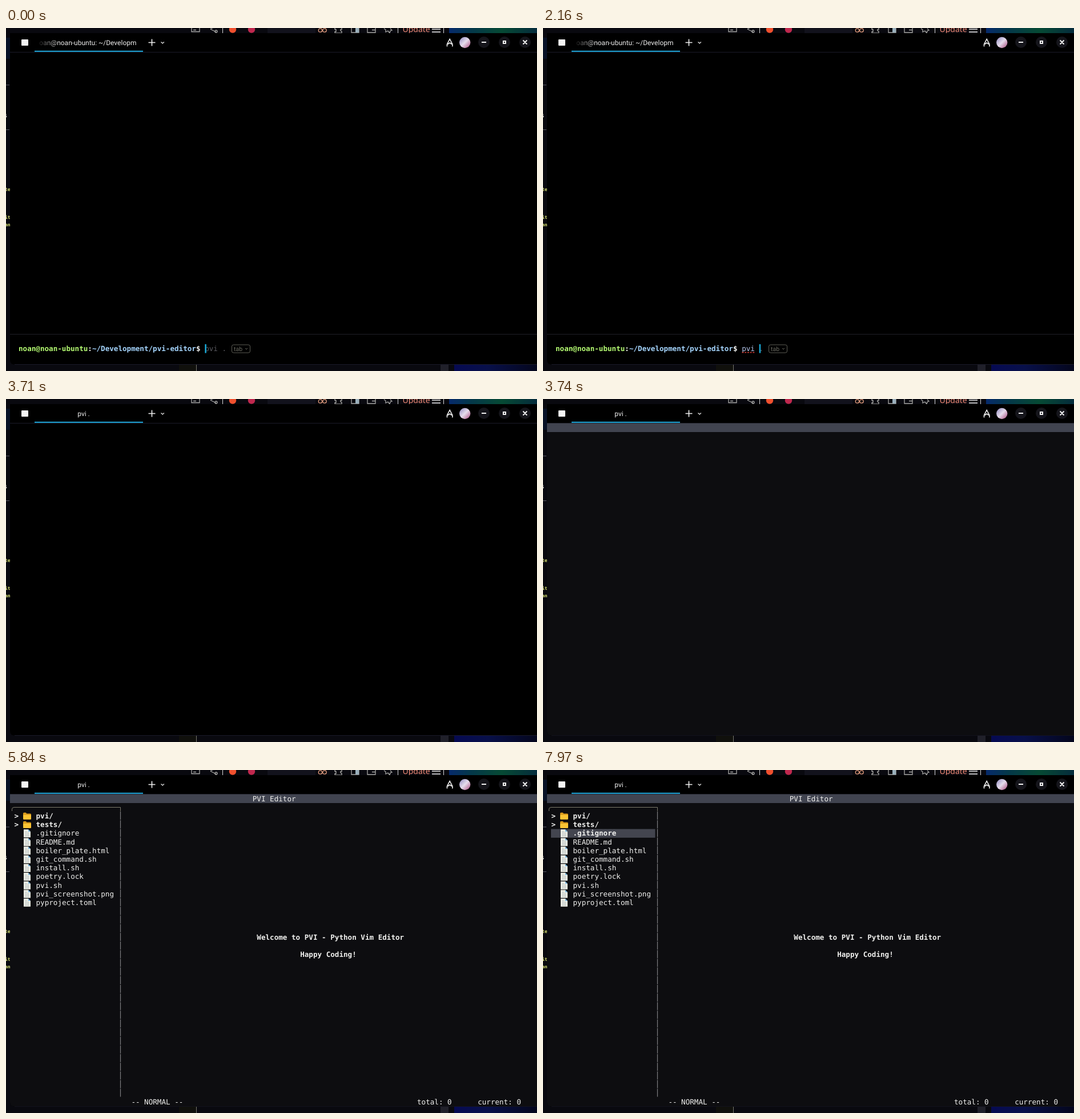
An HTML page for the animation above (7990 ms loop, 930 by 602 pixels).

```html
<!DOCTYPE html>
<html lang="en">
<head>
<meta charset="utf-8">
<title>Terminal editor</title>
<style>
html, body { margin: 0; width: 100%; height: 100%; overflow: hidden; background: #000; }
svg { display: block; width: 930px; height: 602px; }
text { white-space: pre; text-rendering: geometricPrecision; }
.mono { font: 12.6px "DejaVu Sans Mono", monospace; fill: #f0f0ee; }
.bold { font-weight: 700; }
.ui { font: 12px Roboto, sans-serif; fill: #ececec; }
.line { fill: none; stroke: #f2f2f2; stroke-width: 1.6; }
.icon { fill: none; stroke: #a9a9a6; stroke-width: 1.3; }
.lime { fill: #b4fa72; }
.sky { fill: #a5d5fe; }
.ghost { fill: #5a5a60; }
.side { font: bold 8px "DejaVu Sans Mono", monospace; fill: #d6e070; }
</style>
</head>
<body>
<svg viewBox="0 0 930 602" xmlns="http://www.w3.org/2000/svg">
  <defs>
    <linearGradient id="aurora">
      <stop offset="0" stop-color="#062a6c"/><stop offset=".25" stop-color="#04384a"/>
      <stop offset=".6" stop-color="#064a34"/><stop offset="1" stop-color="#052c3c"/>
    </linearGradient>
    <linearGradient id="deep">
      <stop offset="0" stop-color="#060a52"/><stop offset=".4" stop-color="#08104a"/>
      <stop offset="1" stop-color="#04061c"/>
    </linearGradient>
    <linearGradient id="face" x2="1" y2="1">
      <stop offset="0" stop-color="#8f88c0"/><stop offset=".5" stop-color="#e6dcec"/>
      <stop offset="1" stop-color="#a8487c"/>
    </linearGradient>
    <linearGradient id="fade" gradientUnits="userSpaceOnUse" x1="58" x2="92">
      <stop offset="0" stop-color="#ececec" stop-opacity=".1"/><stop offset="1" stop-color="#ececec"/>
    </linearGradient>
    <clipPath id="tabClip"><rect x="58.5" y="12" width="171" height="26"/></clipPath>
    <g id="folder">
      <path d="M0 2.5q0-1.5 1.5-1.5h3.2l1.6 1.8h6.2q1.5 0 1.5 1.5v7.2q0 1.5-1.5 1.5h-11q-1.5 0-1.5-1.5z" fill="#d99a1c"/>
      <path d="M0 5h14v6.5q0 1.5-1.5 1.5h-11q-1.5 0-1.5-1.5z" fill="#fbc434"/>
    </g>
    <g id="file">
      <path d="M1 0h8l4 4v10h-12z" fill="#eef0e6"/>
      <path d="M9 0v4h4z" fill="#6fb0dc"/>
      <path d="M3 4h4.5M3 6.5h8M3 9h8M3 11.5h8" stroke="#b4bcc0" fill="none"/>
    </g>
  </defs>

  <!-- desktop around the window -->
  <rect width="930" height="602" fill="#09090f"/>
  <rect y="17" width="7" height="37" fill="#081226"/>
  <rect x="458" width="84" height="9" fill="#12121c"/>
  <rect x="776" width="154" height="10" fill="url(#aurora)"/>
  <rect x="303" y="590" width="30" height="12" fill="#10100c"/>
  <rect x="333" y="590" width="1" height="12" fill="#77776e"/>
  <rect x="761" y="590" width="14" height="12" fill="#20202a"/>
  <rect x="785" y="590" width="145" height="12" fill="url(#deep)"/>
  <path d="M0 100h6M0 178.500h6" stroke="#5c5c66"/>
  <text class="side" x="-3" y="157" style="fill:#ddd">S</text>
  <text class="side" x="-2" y="286">te</text>
  <text class="side" x="-2" y="335">it</text>
  <text class="side" x="-2" y="348">an</text>
  <path class="icon" d="M325 0v6.500h14v-6.500M328 3.500h5M358 2l10 5M358 1.500l7-3"/>
  <circle class="icon" cx="368" cy="6" r="2"/>
  <path d="M379.500 0v9M686.500 0v9M766.500 0v9" stroke="#d8d8d8"/>
  <circle cx="397" cy="2.500" r="6.200" fill="#f0502e"/>
  <circle cx="430" cy="2.500" r="6.200" fill="#c0284e"/>
  <g class="icon">
    <circle cx="550.500" cy="4" r="3.200" stroke="#e8a080"/><circle cx="558" cy="4" r="3.200" stroke="#e8a080"/>
    <path d="M576 0v2.500h2v4h-2v2.500h12v-3q-3-1-2-3.500h2v-2.500M605 0v8h13v-8M633 0v8h14v-8M641 3.500h6M662 1l3 2v4l4-2 3 4 1-4 3-1-3-3"/>
  </g>
  <rect x="612" width="6" height="8" fill="#9ab0bc"/>
  <text x="694.500" y="7" style="font:14px 'Noto Sans',sans-serif;fill:#ee8a76">Update</text>
  <path class="line" d="M746 2h15M746 7h15"/>

  <!-- window -->
  <path d="M7 9h923v581.500h-915q-8 0-8-8z" fill="#000"/>
  <path d="M7 42.500h923M15 590.500h915" stroke="#1a1a28"/>
  <rect x="27" y="20" width="12" height="11" rx="1" fill="#f4f4f4"/>
  <rect x="50" y="39.800" width="190" height="2" fill="#1ea8dc"/>
  <g clip-path="url(#tabClip)" data-at="0 3090">
    <text class="ui" x="228.500" y="29.500" text-anchor="end" style="fill:url(#fade)">noan@noan-ubuntu: ~/Developm</text>
  </g>
  <text class="ui" x="136" y="29.500" text-anchor="middle" data-at="3090 7990">pvi .</text>
  <path class="line" d="M249.500 25.500h12M255.500 19.500v12"/>
  <path class="line" style="stroke-width:1.200" d="M271.500 24.500l2.700 2.500 2.700-2.500"/>
  <path class="line" d="M772.500 32.500v-4l4.700-9 4.700 9v4M773.500 28.500l3.700-2.500 3.700 2.500"/>
  <circle cx="803.700" cy="25.500" r="9.700" fill="url(#face)"/>
  <g fill="#15151b"><circle cx="837" cy="25" r="10"/><circle cx="873" cy="25" r="10"/><circle cx="909" cy="25" r="10"/></g>
  <path class="line" style="stroke-width:2" d="M833 25h8M871 23h4v4h-4zM905.500 21.500l7 7M912.500 21.500l-7 7"/>

  <!-- shell -->
  <g data-at="0 3710" id="shell">
    <path id="rule" d="M7 537.500h923" stroke="#202028"/>
    <text class="mono bold" x="22" y="567"><tspan class="lime">noan@noan-ubuntu</tspan>:<tspan class="sky">~/Development/pvi-editor</tspan>$</text>
    <text class="mono" id="typed" y="567" style="fill:#b6c8ee"></text>
    <text class="mono ghost" id="rest" y="567"></text>
    <path data-at="2000 2660" d="M348.500 569.500h22" stroke="#e0443c" stroke-width="1.600" stroke-dasharray="3 1.700"/>
    <rect data-at="0 3090" id="caret" y="555" width="2.500" height="15.500" fill="#19aad8"/>
    <g data-at="0 2810">
      <rect x="395.500" y="556" width="32" height="14" rx="3" fill="none" stroke="#5c5c54"/>
      <text x="399" y="566.700" style="font:10.500px Roboto,sans-serif;fill:#6c6c62">tab</text>
      <path d="M419 562l2 2 2-2" fill="none" stroke="#6c6c62"/>
    </g>
  </g>

  <!-- editor -->
  <g data-at="3740 7990">
    <path d="M7 42.500h923v548h-915q-8 0-8-8z" fill="#0d0d10"/>
    <rect x="7" y="42.500" width="923" height="15.500" fill="#414450"/>
    <g data-at="4210 7990" id="head"></g>
    <g data-at="4210 4970" id="wide"></g>
    <g data-at="4970 7990" id="split">
      <path d="M10.500 72v-3q0-3.500 3.500-3.500h186.500v7" fill="none" stroke="#7c7a6c"/>
      <path d="M200.500 73v501" stroke="#7e7e80" stroke-width="1.200" stroke-dasharray="14.200 1"/>
      <rect id="bar" x="14" width="182.500" height="15.200" fill="#43454f"/>
    </g>
  </g>
</svg>
<script>
const LOOP = 7990, CELL = 7.585, ROW = 15.2, LEFT = 7, TOP = 42.8;
const CMD = "pvi .", CMD_X = 22 + 43 * CELL;
const KEYS = [1700, 1850, 2000, 2160, 2660];
// [time, selected row]
const PICKS = [[6270, 0], [6690, 1], [6850, 2], [7010, 3], [7180, 4], [7340, 5], [7650, 4], [7820, 3], [7970, 2]];
const FILES = ["pvi/", "tests/", ".gitignore", "README.md", "boiler_plate.html", "git_command.sh",
  "install.sh", "poetry.lock", "pvi.sh", "pvi_screenshot.png", "pyproject.toml"];
const $ = id => document.getElementById(id);

function add(parent, tag, attrs, text = "") {
  const el = document.createElementNS("http://www.w3.org/2000/svg", tag);
  for (const k in attrs) el.setAttribute(k, attrs[k]);
  el.textContent = text;
  return parent.appendChild(el);
}

function put(id, col, row, text, bold) {
  return add($(id), "text", {
    class: bold ? "mono bold" : "mono", x: LEFT + col * CELL, y: TOP + row * ROW + 11.7
  }, text);
}

function screen(id, welcome, mode, total, current) {
  put(id, welcome, 16, "Welcome to PVI - Python Vim Editor", true);
  put(id, welcome + 10, 18, "Happy Coding!", true);
  put(id, mode, 35, "-- NORMAL --");
  put(id, total, 35, "total: 0");
  put(id, current, 35, "current: 0");
}

put("head", 56, 0, "PVI Editor");
screen("wide", 45, 4, 87, 105);
screen("split", 57, 28, 94, 108);
const names = FILES.map((name, i) => {
  const dir = name.endsWith("/");
  if (dir) put("split", 1, i + 2, ">", true);
  add($("split"), "use", { href: dir ? "#folder" : "#file", x: 30, y: TOP + (i + 2) * ROW + .6 });
  return put("split", 6, i + 2, name, dir);
});

const timed = [...document.querySelectorAll("[data-at]")].map(el => [el, ...el.dataset.at.split(" ").map(Number)]);

function draw(t) {
  for (const [el, from, to] of timed) el.style.display = t >= from && t < to ? "" : "none";

  const n = KEYS.filter(k => t >= k).length, x = CMD_X + n * CELL;
  $("typed").textContent = CMD.slice(0, n);
  $("typed").setAttribute("x", CMD_X);
  $("rest").textContent = CMD.slice(n);
  $("rest").setAttribute("x", x);
  $("caret").setAttribute("x", x + .2);
  $("shell").setAttribute("transform", `translate(0 ${t >= 3340 ? -51 : 0})`);
  $("rule").style.display = t >= 3090 && t < 3340 ? "none" : "";

  const pick = PICKS.filter(p => t >= p[0]).pop();
  const row = pick ? pick[1] : -1;
  $("bar").style.display = row < 0 ? "none" : "";
  $("bar").setAttribute("y", TOP + (row + 2) * ROW);
  names.forEach((el, i) => el.classList.toggle("bold", i < 2 || i === row));
}

const start = performance.now();
function tick() {
  draw((performance.now() - start) % LOOP);
  requestAnimationFrame(tick);
}
tick();
</script>
</body>
</html>
```
